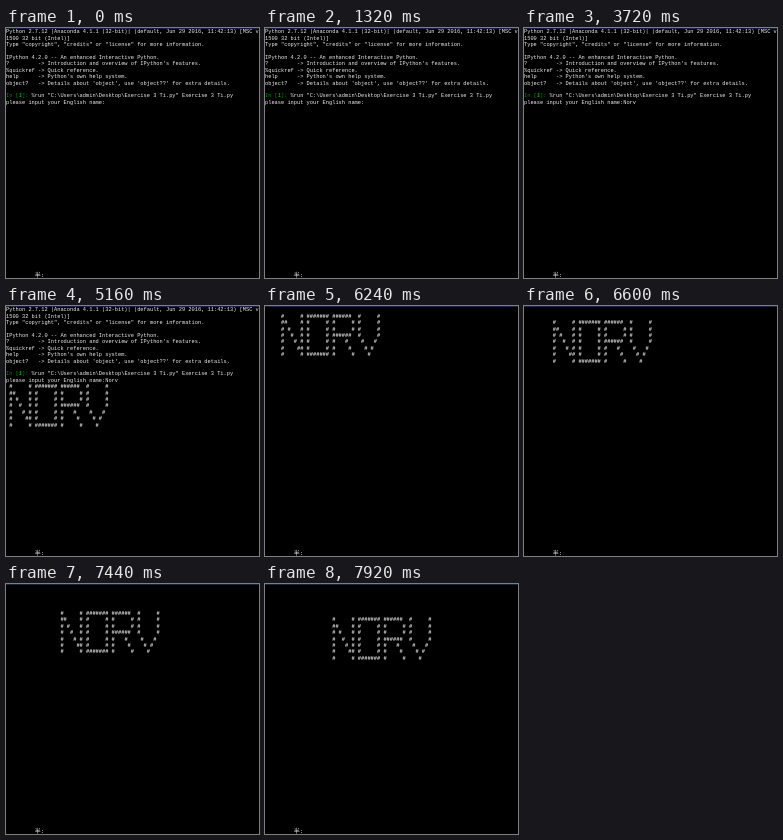
An HTML page that plays this animation: 253 by 250 pixels, repeating every 8 s.

```html
<!DOCTYPE html>
<html lang="en">
<head>
<meta charset="utf-8">
<title>Console name banner</title>
<style>
  html, body {
    margin: 0;
    width: 100%;
    height: 100%;
    overflow: hidden;
    background: #000;
  }

  .stage {
    position: absolute;
    inset: 0;
    overflow: clip;
  }

  .edge {
    position: absolute;
    inset: 0 0 auto;
    height: 1px;
    background: #14233d;
  }

  /* Console cells are 8 x 16 units, shown at 0.4 scale. */
  .screen {
    --col: 8px;
    --row: 16px;
    position: absolute;
    left: 0;
    top: 1.2px;
    width: 632px;
    height: 622px;
    overflow: clip;
    transform: scale(.4);
    transform-origin: 0 0;
    color: #eee;
    font: 13.333px/16px "Liberation Mono", monospace;
  }

  .screen > *, .shell > * { position: absolute; }
  pre { margin: 0; font: inherit; left: 0; top: 0; white-space: pre; }
  .in { color: #008a00; }
  .in b { color: #00e000; font-weight: normal; }

  .name, .cursor, .banner, .shell { animation: 8s step-end infinite; }

  .shell { left: 0; top: 0; width: 632px; height: 320px; animation-name: clear; }

  .name {
    left: calc(31 * var(--col));
    top: calc(11 * var(--row));
    overflow: hidden;
    animation-name: type;
  }

  .cursor {
    top: calc(11 * var(--row) + 13px);
    width: var(--col);
    height: 2px;
    background: #eee;
    animation-name: blink;
  }

  .banner { font-weight: bold; animation-name: walk; }

  .ime {
    left: calc(9 * var(--col));
    top: calc(38 * var(--row));
    font-family: "Liberation Mono", "Noto Sans CJK SC", "Noto Sans CJK", monospace;
    font-size: 15px;
    white-space: pre;
  }

  @keyframes clear {
    0% { visibility: visible; }
    78%, 100% { visibility: hidden; }
  }

  @keyframes type {
    0% { width: 0; }
    18% { width: 8px; }
    28.5% { width: 16px; }
    33% { width: 24px; }
    42%, 100% { width: 32px; }
  }

  @keyframes blink {
    0% { left: 248px; opacity: 0; }
    7.5% { left: 248px; opacity: 1; }
    16.5% { left: 248px; opacity: 0; }
    18% { left: 256px; opacity: 1; }
    24% { left: 256px; opacity: 0; }
    28.5% { left: 264px; opacity: 1; }
    31.5% { left: 264px; opacity: 0; }
    33% { left: 272px; opacity: 1; }
    39% { left: 272px; opacity: 0; }
    42% { left: 280px; opacity: 1; }
    46.5% { left: 280px; opacity: 0; }
    54% { left: 280px; opacity: 1; }
    63%, 100% { left: 280px; opacity: 0; }
  }

  /* Below the prompt first, then four columns and one row per step. */
  @keyframes walk {
    0% { left: 8px; top: 192px; visibility: hidden; }
    64.5% { left: 8px; top: 192px; visibility: visible; }
    78% { left: 40px; top: 16px; visibility: visible; }
    82.5% { left: 72px; top: 32px; visibility: visible; }
    88.5% { left: 104px; top: 48px; visibility: visible; }
    93% { left: 136px; top: 64px; visibility: visible; }
    99%, 100% { left: 168px; top: 80px; visibility: visible; }
  }
</style>
</head>
<body>
<div class="stage">
<div class="edge"></div>
<div class="screen">
  <div class="shell">
<pre>Python 2.7.12 |Anaconda 4.1.1 (32-bit)| (default, Jun 29 2016, 11:42:13) [MSC v.
1500 32 bit (Intel)]
Type "copyright", "credits" or "license" for more information.

IPython 4.2.0 -- An enhanced Interactive Python.
?         -> Introduction and overview of IPython's features.
%quickref -> Quick reference.
help      -> Python's own help system.
object?   -> Details about 'object', use 'object??' for extra details.

<span class="in">In [<b>1</b>]:</span> %run "C:\Users\admin\Desktop\Exercise 3 Ti.py" Exercise 3 Ti.py
please input your English name:</pre>
    <span class="name">Norv</span>
    <span class="cursor"></span>
  </div>
<pre class="banner">#     # ####### ######  #     #
##    # #     # #     # #     #
# #   # #     # #     # #     #
#  #  # #     # ######  #     #
#   # # #     # #   #    #   # 
#    ## #     # #    #    # #  
#     # ####### #     #    #   </pre>
  <div class="ime">半:</div>
</div>
</div>
</body>
</html>
```
